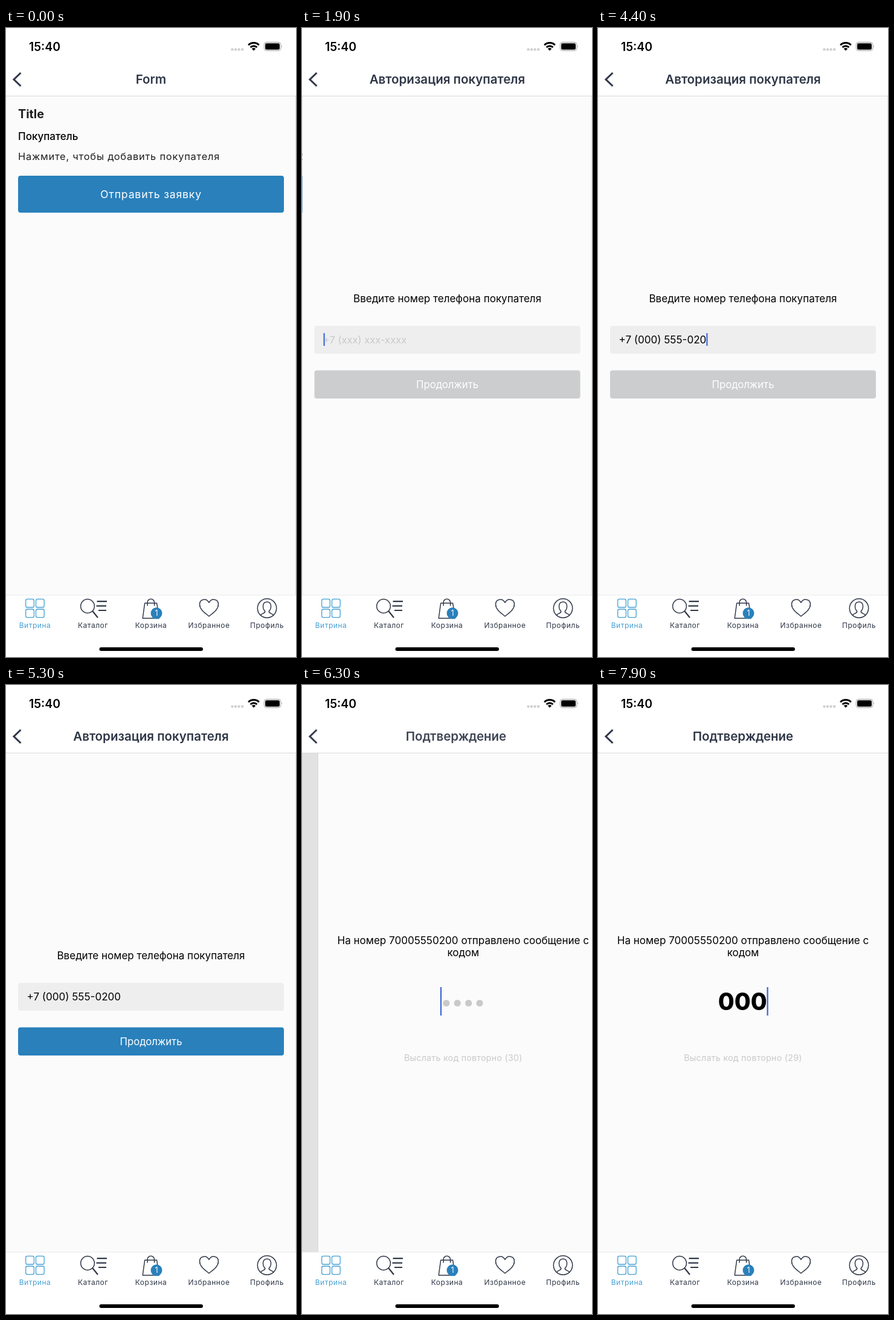
An HTML page for the animation above (8000 ms loop, 480 px wide and 1039 px high).

```html
<!DOCTYPE html>
<html lang="ru">
<head>
<meta charset="utf-8">
<title>Form</title>
<style>
  html, body { margin: 0; width: 100%; height: 100%; overflow: hidden; background: #fff; }
  svg { display: block; width: 100%; height: 100%; }
  text { font-family: Inter, Roboto, sans-serif; white-space: pre; }
  .mid { text-anchor: middle; }
  .title { font-size: 20.5px; font-weight: 600; fill: #2f3747; text-anchor: middle; }
  .body { font-size: 17.05px; }
  .hint { fill: #c9c9c9; }
  .body.hint { font-size: 16.5px; }
  .button { fill: #2980bb; }
  .caret { fill: #4169d8; }
  .edge { opacity: .06; }
  .tab { font-size: 12px; letter-spacing: .5px; text-anchor: middle; fill: #2f3747; }
  .icon { fill: none; stroke: #2f3747; stroke-width: 1.5; stroke-linejoin: round; }
</style>
</head>
<body>
<svg viewBox="0 0 480 1039">
  <rect width="480" height="1039" fill="#fff"/>

  <g id="cardForm">
    <rect y="112" width="480" height="826" fill="#fbfbfb"/>
    <text x="20" y="149" font-size="19.8" font-weight="700" fill="#1f1f1f">Title</text>
    <text x="20" y="185" font-size="17" font-weight="500">Покупатель</text>
    <text id="addBuyer" x="20" y="218" font-size="16.4" letter-spacing=".79" fill="#1f1f1f">Нажмите, чтобы добавить покупателя</text>
    <rect class="button" x="20" y="244" width="440" height="61" rx="4"/>
    <text class="mid" x="240" y="281" font-size="17.7" letter-spacing=".8" fill="#fff">Отправить заявку</text>
  </g>
  <rect id="dimForm" y="112" width="480" height="826"/>

  <g id="cardPhone">
    <rect class="edge" x="-1" y="112" width="1" height="826"/>
    <rect y="112" width="480" height="826" fill="#fbfbfb"/>
    <g id="phoneForm">
      <text class="mid body" x="240" y="453">Введите номер телефона покупателя</text>
      <rect x="20" y="492" width="440" height="46" rx="4" fill="#eee"/>
      <text id="phone" x="34.5" y="520.5"></text>
      <rect id="phoneCaret" class="caret" y="504" width="2.2" height="21"/>
      <g id="submit">
        <rect id="submitBox" x="20" y="565.5" width="440" height="46.5" rx="4"/>
        <text class="mid" x="240" y="594.5" font-size="16.7" fill="#fff">Продолжить</text>
      </g>
    </g>
    <g id="loader">
      <circle id="pulseOut" cx="240.5" cy="524.5" fill="#d8d9da"/>
      <circle id="pulseIn" cx="240.5" cy="524.5" fill="#d0d1d2"/>
    </g>
  </g>
  <rect id="dimPhone" y="112" width="480" height="826"/>

  <g id="cardCode">
    <rect class="edge" x="-1" y="112" width="1" height="826"/>
    <rect y="112" width="480" height="826" fill="#fbfbfb"/>
    <text class="mid body" x="240" y="427.5">На номер 70005550200 отправлено сообщение с</text>
    <text class="mid body" x="240" y="448">кодом</text>
    <g id="codeDots" fill="#c9c9c9">
      <circle cx="212" cy="525.5" r="5.6"/><circle cx="230.4" cy="525.5" r="5.6"/>
      <circle cx="248.8" cy="525.5" r="5.6"/><circle cx="267.2" cy="525.5" r="5.6"/>
    </g>
    <text id="code" class="mid" x="239.3" y="537" font-size="39" font-weight="800"></text>
    <rect id="codeCaret" class="caret" y="499" width="2.3" height="47"/>
    <text id="resend" class="mid hint" x="240" y="621" font-size="14.25" letter-spacing=".25"></text>
  </g>

  <rect width="480" height="112" fill="#fff"/>
  <rect y="111.8" width="480" height="1" fill="#d9d9d9"/>
  <text id="titleForm" class="title" x="240" y="92">Form</text>
  <text id="titlePhone" class="title" x="240" y="92">Авторизация покупателя</text>
  <text id="titleCode" class="title" x="240" y="92">Подтверждение</text>
  <path id="back" d="M24.4 74L13 85L24.4 96" fill="none" stroke="#2f3747" stroke-width="3"/>

  <text x="38" y="37.5" font-size="19.4" font-weight="600">15:40</text>
  <g fill="#d0d0d0">
    <circle cx="374.5" cy="35.5" r="2.2"/><circle cx="380" cy="35.5" r="2.2"/>
    <circle cx="385.6" cy="35.5" r="2.2"/><circle cx="391.2" cy="35.5" r="2.2"/>
  </g>
  <g fill="none" stroke="#000" stroke-width="3">
    <path d="M401.2 28.2a12.6 12.6 0 0 1 17.6 0M404.6 32a7.6 7.6 0 0 1 10.8 0"/>
    <path d="M410 37.5l-3.2-3.3a4.6 4.6 0 0 1 6.4 0z" fill="#000" stroke="none"/>
  </g>
  <rect x="427.3" y="23.5" width="27.5" height="14" rx="4" fill="none" stroke="#9b9b9b"/>
  <rect x="429" y="25.2" width="24" height="10.6" rx="2.4"/>
  <path d="M456 28.3q1.8 2.2 0 4.5z" fill="#9b9b9b"/>

  <rect y="937" width="480" height="102" fill="#fff"/>
  <rect y="936.3" width="480" height="1" fill="#e9e9e9"/>
  <g class="icon" style="stroke:#46a0d4;stroke-width:1.3">
    <rect x="32.7" y="943.3" width="13.7" height="13.7" rx="2.6"/><rect x="49.5" y="943.3" width="13.7" height="13.7" rx="2.6"/>
    <rect x="32.7" y="960" width="13.7" height="13.7" rx="2.6"/><rect x="49.5" y="960" width="13.7" height="13.7" rx="2.6"/>
  </g>
  <g class="icon">
    <circle cx="135" cy="955" r="11.4"/>
    <path d="M143.3 963.2L152 974M150.5 947.2H167M149.5 954.6H166M153 962H166" stroke-width="2.2"/>
    <path d="M229.7 950H249.6L253.3 975H226.2ZM234 954.5V949a5.8 5.8 0 0 1 11.6 0V954.5"/>
    <path d="M336 971.8C330 966.5 320.5 961 320.5 952C320.5 943 332 941 336 949.2C340 941 351.5 943 351.5 952C351.5 961 342 966.5 336 971.8Z"/>
    <circle cx="432" cy="958.5" r="15.7"/>
    <path d="M421.5 970C423 966.5 429 967.5 428.8 963.5C423.5 958 424.5 948 432 948C439.5 948 440.5 958 435.2 963.5C435 967.5 441 966.5 442.5 970"/>
  </g>
  <circle cx="249" cy="966.8" r="9.5" fill="#2980bb"/>
  <text class="mid" x="249" y="971.3" font-size="12.5" fill="#fff">1</text>
  <text class="tab" x="48" y="991" style="fill:#46a0d4">Витрина</text>
  <text class="tab" x="144" y="991">Каталог</text>
  <text class="tab" x="240" y="991">Корзина</text>
  <text class="tab" x="336" y="991">Избранное</text>
  <text class="tab" x="432" y="991">Профиль</text>
  <rect x="154.5" y="1023" width="171.5" height="6" rx="3"/>
</svg>
<script>
const LOOP = 8000, STEP = 100, WIDTH = 480;
const PHONE = '+7 (000) 555-0200', HINT = '+7 (xxx) xxx-xxxx';

// Each table holds [time, value] pairs; a value stays until the next time.
const PHONE_LENGTH = [[0, 0], [3000, 5], [3100, 6], [3200, 7], [3400, 10], [3500, 11],
  [3700, 12], [3900, 14], [4100, 15], [4300, 16], [4500, 17]];
const PHONE_CARET = [[0, 1], [2200, .6], [2300, .3], [2400, 0], [2600, .3], [2700, .6],
  [2800, 1], [5100, .6], [5200, .25], [5300, 0]];
const CODE_CARET = [[0, 1], [6700, .6], [6800, .3], [6900, 0], [7100, .3], [7200, .6], [7300, 1]];
const CODE_LENGTH = [[0, 0], [7500, 1], [7700, 2], [7900, 3]];
const ROW_PRESS = [[0, 1], [1300, .5], [1400, .5], [1500, .75], [1600, 1]];
const SUBMIT_PRESS = [[0, 1], [5500, .6], [5600, .4], [5700, .75]];

const el = {};
document.querySelectorAll('[id]').forEach(node => el[node.id] = node);

const held = (table, t) => table.filter(([time]) => time <= t).pop()[1];
const clamp = v => Math.min(1, Math.max(0, v));
const set = (node, name, value) => node.setAttribute(name, value);
const shift = (node, x) => set(node, 'transform', `translate(${x.toFixed(2)} 0)`);
const show = (node, on) => set(node, 'visibility', on ? 'inherit' : 'hidden');

// Critically damped spring from 0 to 1.
function spring(t, start) {
  const a = Math.max(0, t - start) * .0179;
  const p = 1 - (1 + a) * Math.exp(-a);
  return p > .999 ? 1 : p;
}

function push(p, from, to, fromShift, toShift) {
  shift(el['card' + to], WIDTH * (1 - p));
  set(el['dim' + from], 'opacity', .1 * clamp((p - .27) * 1.85));
  shift(el['title' + to], toShift * (1 - p));
  set(el['title' + to], 'opacity', clamp((p - .43) * 1.8));
  if (p > 0) {
    shift(el['card' + from], -.3 * WIDTH * p);
    shift(el['title' + from], -fromShift * p);
    set(el['title' + from], 'opacity', clamp(1 - p * 1.3));
  }
}

function drawPhone(t) {
  const length = held(PHONE_LENGTH, t);
  el.phone.textContent = length ? PHONE.slice(0, length) : HINT;
  set(el.phone, 'class', length ? 'body' : 'body hint');
  set(el.phoneCaret, 'x', length ? 34.5 + el.phone.getComputedTextLength() : 35);
  set(el.phoneCaret, 'opacity', held(PHONE_CARET, t));
  set(el.submitBox, 'fill', length === PHONE.length ? '#2980bb' : '#cccdcf');
  set(el.submit, 'opacity', held(SUBMIT_PRESS, t));

  const loading = t >= 5900;
  show(el.phoneForm, !loading);
  show(el.loader, loading);
  const radius = 45 * (.5 + .5 * Math.cos(Math.PI * (t - 5815) / 1000));
  set(el.pulseOut, 'r', radius);
  set(el.pulseIn, 'r', 45 - radius);
}

function drawCode(t) {
  const length = held(CODE_LENGTH, t);
  show(el.codeDots, !length);
  el.code.textContent = '0'.repeat(length);
  set(el.codeCaret, 'x', length ? 239 + el.code.getComputedTextLength() / 2 : 202);
  set(el.codeCaret, 'opacity', held(CODE_CARET, t));
  el.resend.textContent = `Выслать код повторно (${t < 7300 ? 30 : 29})`;
}

function draw(t) {
  const first = spring(t, 1390.5), second = spring(t, 6042.5);
  shift(el.cardForm, 0);
  shift(el.titleForm, 0);
  set(el.titleForm, 'opacity', 1);
  set(el.addBuyer, 'opacity', held(ROW_PRESS, t));
  push(first, 'Form', 'Phone', 160, 398);
  push(second, 'Phone', 'Code', 55, 268);
  const p = second || first;
  set(el.back, 'opacity', 1 - .6 * p * (1 - p));
  drawPhone(t);
  drawCode(t);
}

const start = performance.now();
function tick() {
  const t = (performance.now() - start) % LOOP;
  draw(Math.floor(t / STEP) * STEP);
  requestAnimationFrame(tick);
}
tick();
</script>
</body>
</html>
```
